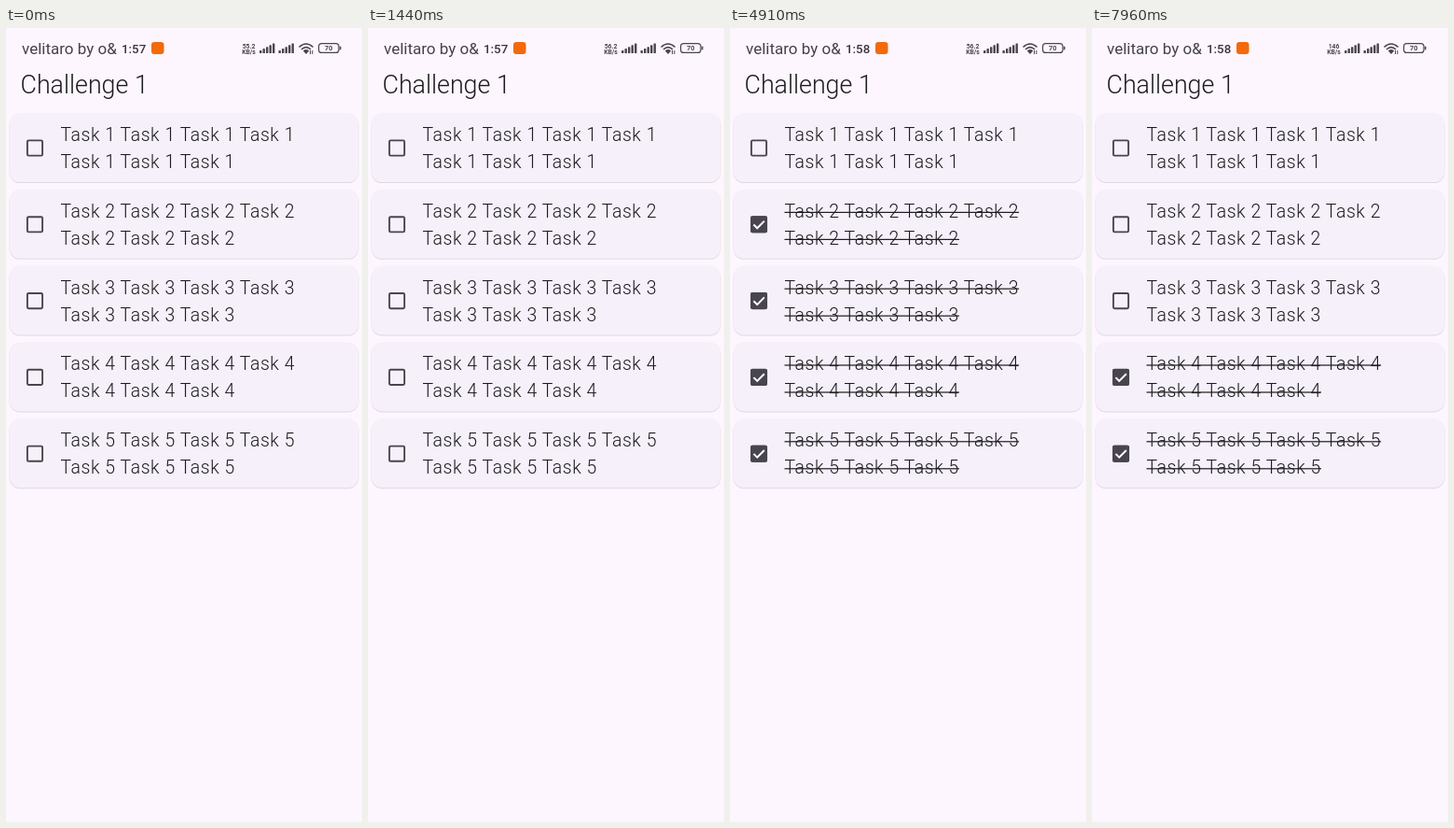
An HTML page for the animation above (8 s loop, 382 px wide and 850 px high).

```html
<!DOCTYPE html>
<html lang="en">
<head>
<meta charset="utf-8">
<title>Challenge list</title>
<style>
  html, body { margin: 0; width: 100%; height: 100%; overflow: hidden; background: #fef6fe; }
  svg { display: block; width: 382px; height: 850px; font-family: Roboto, sans-serif; fill: #1d1b20; }
  .title { font-size: 26.8px; font-weight: 300; }
  .task { font-size: 19.4px; font-weight: 300; letter-spacing: .58px; }
  .carrier { font-size: 17px; fill: #454148; }
  .clock { font-size: 13.3px; font-weight: 500; fill: #39353c; }
  .tiny { font-size: 6.8px; font-weight: 700; text-anchor: middle; fill: #49454c; }
  .icon { fill: #49454c; }
  .line { fill: none; stroke: #49454f; }
</style>
</head>
<body>
<svg id="stage" viewBox="0 0 382 850">
  <g id="status">
    <text class="carrier" x="17" y="28">velitaro by o&amp;</text>
    <text class="clock" id="clock" x="124" y="26.5">1:57</text>
    <rect x="156" y="15" width="13.5" height="13" rx="3.2" fill="#f26a0a"/>
    <text class="tiny" id="speed" x="260.5" y="21.5">55.2</text>
    <text class="tiny" x="260.5" y="28">KB/s</text>
    <g class="icon" id="bars"></g>
    <path class="line" stroke-width="1.6" d="M314.5 20.5Q322 13.5 329.5 20.5M317 23Q322 18.3 327 23"/>
    <path class="icon" d="M318.8 24.4Q322 21.6 325.2 24.4L322 28Z"/>
    <path class="line" stroke-width="1" d="M326.5 24v4M328.8 28v-4"/>
    <rect class="line" stroke-width="1.2" x="335.6" y="16.6" width="21.4" height="9.8" rx="3"/>
    <rect class="icon" x="358" y="19.5" width="1.5" height="4" rx=".7"/>
    <text class="tiny" x="346.3" y="24.2" style="font-size:7.4px">70</text>
  </g>
  <text class="title" x="15.5" y="69.5">Challenge 1</text>
</svg>
<script>
const LOOP = 8000, PITCH = 81.8, FADE = 100;
const stage = document.getElementById('stage');
const byId = id => document.getElementById(id);

// When each task is ticked and cleared, in ms
const toggles = [[2600, 4800], [3050, 5950], [3500, 7200], [3950, LOOP], [4400, LOOP]];
const clockSteps = [[0, '1:57'], [3600, '1:58']];
const speedSteps = [[0, '55.2'], [1300, '56.2'], [5300, '146']];

function add(parent, tag, attrs, text = '') {
  const node = document.createElementNS('http://www.w3.org/2000/svg', tag);
  for (const key in attrs) node.setAttribute(key, attrs[key]);
  node.textContent = text;
  return parent.appendChild(node);
}

for (const left of [272, 292.5])
  for (let i = 0; i < 5; i++) {
    const h = 3 + i * 1.9;
    add(byId('bars'), 'rect', { x: left + i * 3.5, y: 27 - h, width: 2.4, height: h, rx: .6 });
  }

function makeTask(index) {
  const row = add(stage, 'g', { transform: `translate(0 ${index * PITCH})` });
  const card = { x: 3.5, width: 375, height: 74, rx: 11.5 };
  add(row, 'rect', { ...card, y: 92, fill: '#dfd8e4' });
  add(row, 'rect', { ...card, y: 91, fill: '#f5f0f9' });
  add(row, 'rect', { class: 'line', x: 22.9, y: 120.4, width: 16.2, height: 16.2, rx: 1.4, 'stroke-width': 1.9 });
  const tick = add(row, 'g', {});
  add(tick, 'rect', { x: 22, y: 119.5, width: 18, height: 18, rx: 2, fill: '#49454f' });
  const mark = add(tick, 'path', {
    d: 'M25.4 128.7l3.8 3.8 7.6-7.7', fill: 'none', stroke: '#fff',
    'stroke-width': 2, pathLength: 1, 'stroke-dasharray': 1
  });
  const strike = add(row, 'g', {});
  [4, 3].forEach((count, line) => {
    const y = 121 + line * 29;
    const words = Array(count).fill(`Task ${index + 1}`).join(' ');
    const text = add(row, 'text', { class: 'task', x: 58.5, y }, words);
    add(strike, 'rect', { x: 58.5, y: y - 6, width: text.getComputedTextLength(), height: 1.2 });
  });
  return { tick, mark, strike };
}

const tasks = toggles.map((_, i) => makeTask(i));
const stepAt = (steps, t) => steps.filter(([start]) => start <= t).pop()[1];
const ramp = (t, start) => Math.min(1, Math.max(0, (t - start) / FADE));

function draw(t) {
  byId('clock').textContent = stepAt(clockSteps, t);
  const speed = stepAt(speedSteps, t);
  byId('speed').textContent = speed;
  byId('status').setAttribute('transform', `translate(${speed === '146' ? -1 : 0} 0)`);
  tasks.forEach(({ tick, mark, strike }, i) => {
    const [on, off] = toggles[i];
    const shown = ramp(t, on);
    tick.setAttribute('opacity', shown - ramp(t, off));
    mark.setAttribute('stroke-dashoffset', 1 - shown);
    strike.setAttribute('visibility', t >= on && t < off ? 'visible' : 'hidden');
  });
}

const begin = performance.now();
function frame() {
  draw((performance.now() - begin) % LOOP);
  requestAnimationFrame(frame);
}
frame();
</script>
</body>
</html>
```
